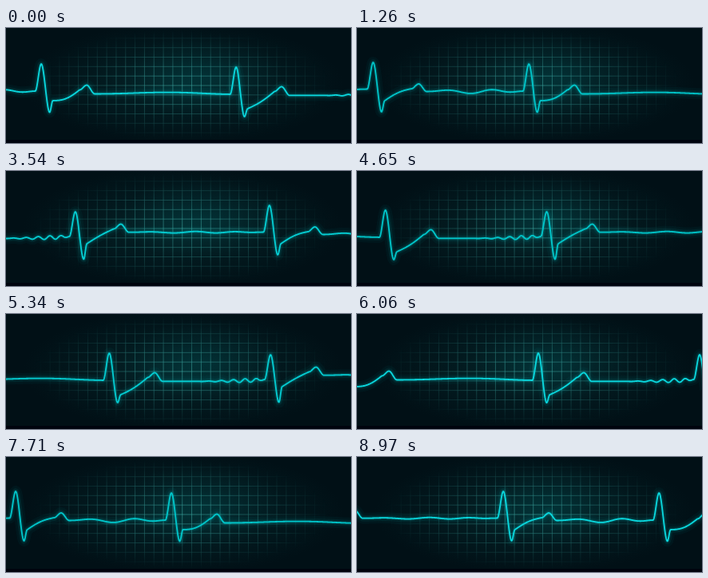
An HTML page with a canvas that plays this animation: 432x144 px, repeating every 9 s.

```html
<!DOCTYPE html>
<html lang="en">
<head>
<meta charset="utf-8">
<title>Heartbeat monitor</title>
<style>
html, body { margin: 0; width: 100%; height: 100%; overflow: hidden; background: #011016; }
#stage {
  position: relative; width: 432px; height: 144px; overflow: hidden;
  background:
    radial-gradient(ellipse 100px 52px at 246px 60px, rgba(0,80,84,.3), transparent),
    radial-gradient(ellipse 200px 76px at 222px 70px, #04282c, #031b20 45%, #011016);
}
#stage::after { content: ""; position: absolute; left: 0; right: 0; bottom: 0; height: 4px; background: #00040e; }
canvas { position: absolute; left: 0; top: 0; }
#grid {
  -webkit-mask-image: radial-gradient(ellipse 186px 70px at 220px 71px, #000, rgba(0,0,0,.5) 50%, transparent);
  mask-image: radial-gradient(ellipse 186px 70px at 220px 71px, #000, rgba(0,0,0,.5) 50%, transparent);
}
</style>
</head>
<body>
<div id="stage">
  <canvas id="grid" width="432" height="144"></canvas>
  <canvas id="trace" width="432" height="144"></canvas>
</div>
<script>
const W = 432, H = 144, LOOP = 9000;
const PERIOD = 884, SPEED = PERIOD / 6510; // strip length in px, px per ms
const CELL = 11.83, RISE = 7.5;

const grid = document.getElementById('grid').getContext('2d');
grid.fillStyle = 'rgba(64,170,166,.6)';
for (let x = 7.3; x < W; x += CELL) grid.fillRect(x, 0, 1, H);
for (let y = .5; y < H; y += CELL) grid.fillRect(0, y, W, 1);

// Heights along each beat, then the ripple of the rest that follows it
const beats = [
  { x: 44, base: 79, peak: 45, trough: 105.5, sag: 4, bump: 71.5, shoulder: 91, rest: 82.5, ripple: -8, waves: .5, grow: 1 },
  { x: 288, base: 83, peak: 49, trough: 111, sag: 2, bump: 73.5, shoulder: 101, rest: 84.4, ripple: 35, waves: 7.5, grow: 5 },
  { x: 490, base: 82, peak: 51, trough: 110.5, sag: -1, bump: 66.5, shoulder: 91, rest: 76.7, ripple: -4, waves: 3, grow: 1 },
  { x: 733, base: 76.5, peak: 43, trough: 105, sag: -2.5, bump: 70, shoulder: 91, rest: 79.5, ripple: -10, waves: 2, grow: 1 }
];

const mod = (a, n) => (a % n + n) % n;
const lerp = (a, b, u) => a + (b - a) * u;
const ease = (a, b, u) => lerp(a, b, u * u * (3 - 2 * u));

function height(x) {
  const start = beats[0].x - RISE;
  x = start + mod(x - start, PERIOD);
  const i = beats.findLastIndex(b => x >= b.x - RISE);
  const b = beats[i], next = beats[(i + 1) % beats.length], d = x - b.x;
  const foot = b.bump + 6;

  if (d < 0) return ease(b.base, b.peak, 1 + d / RISE);
  if (d < 10.5) return ease(b.peak, b.trough, d / 10.5);
  if (d < 14.5) return ease(b.trough, b.shoulder, (d - 10.5) / 4);
  if (d < 48) {
    const u = (d - 14.5) / 33.5;
    return lerp(b.shoulder, foot, u) + b.sag * Math.sin(Math.PI * u);
  }
  if (d < 57) return ease(foot, b.bump, (d - 48) / 9);
  if (d < 67) return ease(b.bump, b.rest, (d - 57) / 10);

  const u = (d - 67) / (mod(next.x - b.x, PERIOD) - RISE - 67);
  const wave = Math.sin(2 * Math.PI * b.waves * u ** 1.25);
  return lerp(b.rest, next.base, u ** 4) + b.ripple * u ** b.grow * (1 - u) * wave;
}

const ctx = document.getElementById('trace').getContext('2d');
ctx.lineJoin = 'round';

function stroke(path, color, width) {
  ctx.strokeStyle = color;
  ctx.lineWidth = width;
  ctx.stroke(path);
}

function draw() {
  const t = performance.now() % LOOP;
  const pulse = ((1 + Math.cos(t / 3000 * 2 * Math.PI)) / 2) ** 2;
  const path = new Path2D();
  for (let x = -4; x <= W + 4; x += .5) path.lineTo(x, height(x - t * SPEED));

  ctx.clearRect(0, 0, W, H);
  stroke(path, 'rgba(0,200,205,.04)', 14);
  stroke(path, 'rgba(0,200,205,.06)', 8);
  stroke(path, 'rgba(0,200,205,.14)', 4.5);
  stroke(path, `rgb(${10 * pulse},${200 + 18 * pulse},${204 + 20 * pulse})`, 1.8);
  requestAnimationFrame(draw);
}
draw();
</script>
</body>
</html>
```
